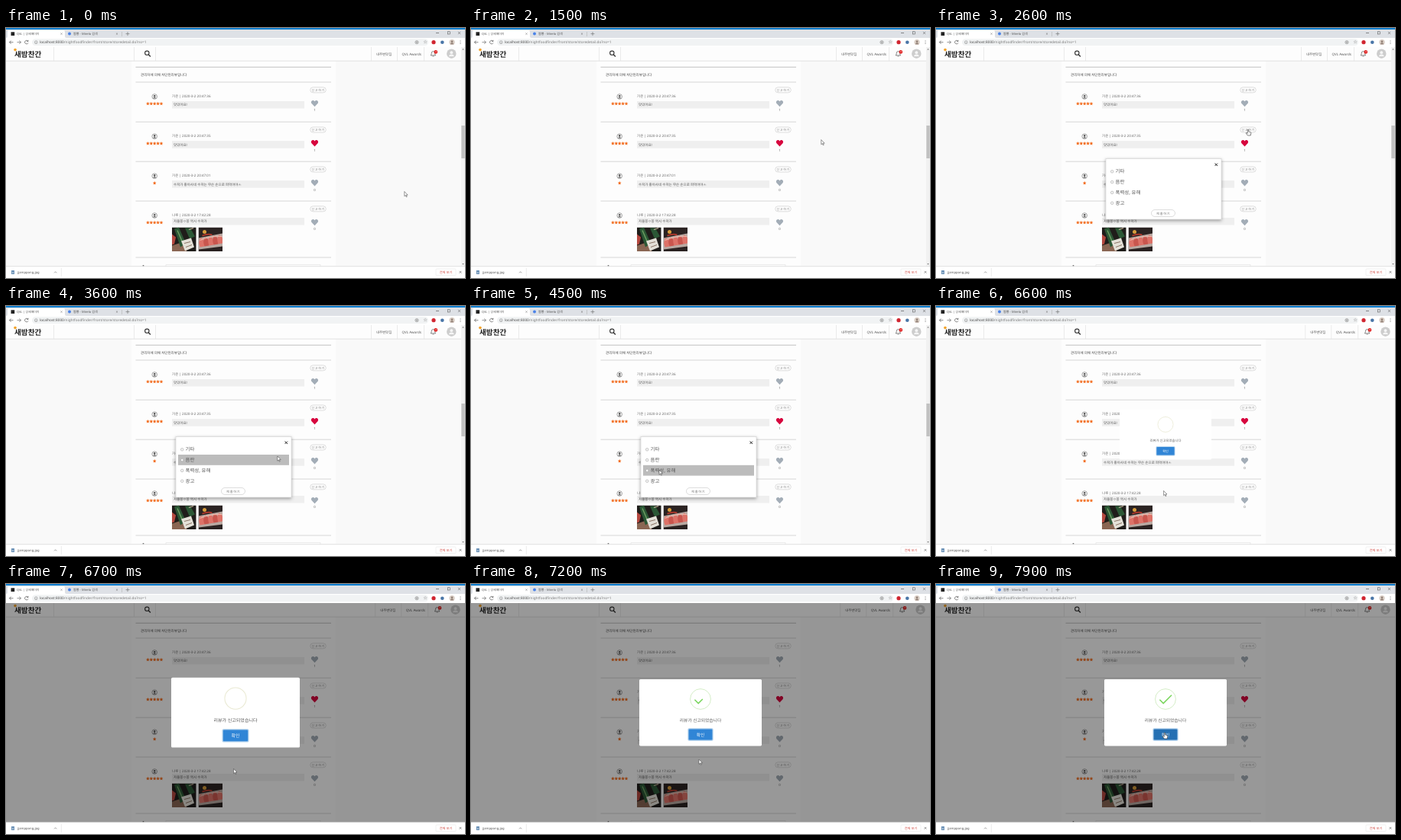
An HTML page for the animation above (8 s loop, 600 px wide and 328 px high).

```html
<!DOCTYPE html>
<html lang="ko">
<head>
<meta charset="utf-8">
<title>Review report</title>
<style>
  html, body { margin: 0; width: 100%; height: 100%; overflow: hidden; background: #fff; }
  svg { display: block; }
  #stage { width: 600px; height: 328px; text-rendering: geometricPrecision;
    font-family: "Noto Sans", "Noto Sans CJK KR", "Noto Sans CJK", sans-serif; }
</style>
</head>
<body>
<svg id="stage" viewBox="0 0 600 328" xmlns="http://www.w3.org/2000/svg"></svg>
<script>
const LOOP = 8000, STEP = 100;
const stage = document.getElementById('stage');

// Drawing helpers; text is placed by its vertical centre.
const rect = (x, y, w, h, fill, extra = '') => `<rect x="${x}" y="${y}" width="${w}" height="${h}" fill="${fill}" ${extra}/>`;
const circle = (x, y, r, fill, extra = '') => `<circle cx="${x}" cy="${y}" r="${r}" fill="${fill}" ${extra}/>`;
const path = (d, stroke, width = .7, fill = 'none', extra = '') =>
  `<path d="${d}" stroke="${stroke}" stroke-width="${width}" fill="${fill}" ${extra}/>`;
const shape = (d, fill) => path(d, 'none', 0, fill);
const text = (x, y, size, content, fill = '#555', extra = '') =>
  `<text x="${x}" y="${y + size * .36}" font-size="${size}px" fill="${fill}" ${extra}>${content}</text>`;
const group = (id, content, extra = '') => `<g id="${id}" ${extra}>${content}</g>`;
const middle = 'text-anchor="middle"';
const cross = (x, y, r, color, width) => path(`M${x - r} ${y - r}l${2 * r} ${2 * r}m0 ${-2 * r}l${-2 * r} ${2 * r}`, color, width);

function star(x, y, r, fill) {
  const points = Array.from({ length: 10 }, (_, i) => {
    const radius = i % 2 ? r * .45 : r, angle = i * Math.PI / 5;
    return `${x + radius * Math.sin(angle)},${y - radius * Math.cos(angle)}`;
  });
  return `<polygon points="${points.join(' ')}" fill="${fill}"/>`;
}

function pill(x, y, w, h, label, size) {
  return rect(x - w / 2, y - h / 2, w, h, '#fff', `rx="${h / 2}" stroke="#bbb" stroke-width=".5"`) +
    text(x + .2, y, size, label, '#777', middle + ' letter-spacing=".7"');
}

function browserTop() {
  return rect(0, 0, 600, 13, '#dee1e6') + rect(0, 0, 600, 2, '#0b7fd0') +
    shape('M0 13Q2 13 2 11V5Q2 3 4 3H75Q77 3 77 5V11Q77 13 79 13Z', '#fff') +
    rect(6.5, 5.3, 4.7, 4.7, '#222') + text(14, 7.6, 3.9, 'QVL | 상세페이지', '#555') + cross(72.5, 7.6, 1.1, '#666', .5) +
    circle(83, 7.6, 2, '#4b83e8') + text(88, 7.6, 4.1, '짬뽕 - Mirelo 검색', '#555') + cross(145, 7.6, 1.1, '#666', .5) +
    path('M151.5 5V11', '#aaa', .5) + path('M156.5 7.6h5m-2.5 -2.5v5', '#666', .6) +
    path('M562 6.5h4', '#444', .6) + rect(577.5, 4.8, 3.2, 3.2, 'none', 'stroke="#444" stroke-width=".5"') + cross(592.5, 6.5, 1.6, '#444', .5) +
    rect(0, 13, 600, 12, '#fff') + rect(34, 14.3, 518, 9, '#f1f3f4', 'rx="4.5"') +
    path('M9.5 18.7h-5m2.2 -2.2l-2.2 2.2l2.2 2.2', '#555', .7) +
    path('M14.5 18.7h5m-2.2 -2.2l2.2 2.2l-2.2 2.2', '#666', .7) +
    path('M28.7 17.2A2.3 2.3 0 1 0 29 19.5M29 15.8v1.8h-1.8', '#555', .7) +
    circle(39.3, 18.7, 1.9, 'none', 'stroke="#777" stroke-width=".5"') + path('M39.3 17.6v.5m0 .5v1.5', '#777', .5) +
    text(44, 18.7, 4.7, '<tspan fill="#444">localhost:8000</tspan>/nightfoodfinder/front/store/storedetail.do?no=1', '#777') +
    circle(537, 18.7, 2.1, 'none', 'stroke="#777" stroke-width=".6"') + path('M535.8 18.7h2.4m-1.2 -1.2v2.4', '#777', .6) +
    text(548, 18.5, 5.2, '☆', '#666', middle) + circle(559, 18.7, 2.6, '#d02530') + circle(570.3, 18.7, 2.3, '#4a76a8') +
    circle(583, 18.7, 3.6, '#d9cdc4') + circle(583, 17.8, 1.2, '#8b7a70') + shape('M580.8 21.2q2.2 -4 4.4 0z', '#8b7a70') +
    [16.8, 18.7, 20.6].map(y => circle(594, y, .5, '#666')).join('');
}

function header() {
  const right = path('M477.5 25V43M511.5 25V43M546.5 25V43', '#e0e0e0', .6) +
    text(484, 34, 4.4, '내주변맛집') + text(517.5, 34, 4.5, 'QVL Awards') +
    path('M555.2 36q1 -.8 1 -2.8q0 -2.6 2.2 -2.6q2.2 0 2.2 2.6q0 2 1 2.8zM557.6 37h1.7', '#555', .7) +
    circle(561.8, 31.4, 2.3, '#e02020') + text(561.8, 31.4, 3, '4', '#fff', middle) +
    circle(582.3, 33.7, 6.2, '#cdcdcd') + circle(582.3, 32.2, 1.9, '#f6f6f6') + shape('M578.9 37.2q.3 -2.7 3.4 -2.7q3.1 0 3.4 2.7z', '#f6f6f6');
  return rect(0, 25, 600, 18, '#fdfdfd') + path('M0 43.2H600', '#dcdcdc', .8) +
    path('M62.5 25V43M167.5 25V43M195.5 25V43', '#e0e0e0', .6) +
    circle(12, 28.6, 1.8, '#f3a32b') + text(11, 34.8, 9.6, '새밤찬간', '#222', 'font-weight="700"') +
    circle(184.3, 32.8, 2.7, 'none', 'stroke="#333" stroke-width="1.1"') + path('M186.3 34.9l2.6 2.7', '#333', 1.4) +
    group('headerRight', right);
}

function review(top, name, date, comment, stars, likes, liked) {
  const boxY = top + (name === '나루' ? 22 : 25);
  const iconY = top + 19;
  const rating = Array.from({ length: stars }, (_, i) => star(194.2 + (i - (stars - 1) / 2) * 4.4, top + 28.3, 2.5, '#f26a1b')).join('');
  return path(`M169.5 ${top}H425`, '#ccc', .8) +
    circle(194.2, iconY, 3.3, '#fff', 'stroke="#666" stroke-width=".6"') + circle(194.2, iconY - .8, 1.3, '#555') +
    shape(`M192 ${iconY + 2.2}q2.2 -3 4.4 0z`, '#555') + rating +
    text(217, top + 18.4, 4.5, `${name} | ${date}`, '#666') +
    rect(217, boxY, 173, 9.5, '#efefef') + text(219, boxY + 4.8, 4.5, comment) +
    pill(408, top + 10.3, 20.5, 7, '신고하기', 4) +
    shape(`M403.5 ${top + 32.2}l-4 -4.2c-2 -2.6 1.6 -6 4 -2.8c2.4 -3.2 6 .2 4 2.8z`, liked ? '#d7063e' : '#a3adb7') +
    text(403.5, top + 36.8, 4.3, likes, '#666', middle);
}

function photos() {
  const bottles = rect(0, 0, 32, 32, '#1f1d1a') + shape('M0 24l12 -4l8 12H0z', '#8a6653') +
    shape('M3 2l6 -2l9 21l-7 5zM17 1h7l6 11l-7 3z', '#2b5735') + path('M7 4l6 14', '#6fa062', 1.4) +
    shape('M12 18l13 -4l4 12l-12 5z', '#e4e1d8') + path('M16 21l8 -2m-6 7l8 -3', '#8a7464', 1) +
    shape('M0 9l5 4l-2 9l-3 1z', '#b5483f') + path('M22 3l6 -2', '#c9b9a0', 1.2);
  const shrimp = rect(0, 0, 32, 32, '#2b2322') + shape('M0 14L32 8V25L0 29z', '#b9a9a2') +
    [0, 1, 2, 3, 4].map(i => shape(`M${2 + i * 6} ${26 - i}q-3 -8 1 -12q6 2 5 11z`, i % 2 ? '#c9564e' : '#dd7268')).join('') +
    path('M2 17Q15 11 31 12', '#efb5a8', 1.2) + circle(8, 6, 2.5, '#d79c3c') + path('M5 11q8 -3 13 -1', '#b73a2d', 1.8);
  const frame = (x, content) => `<svg x="${x}" y="261.5" width="31.5" height="31.5">${content}</svg>`;
  return frame(217, bottles) + frame(251.5, shrimp);
}

function page() {
  return rect(0, 43, 600, 270, '#f9f9f9') + rect(164, 43, 267, 270, '#fdfdfd') +
    path('M169.5 51.3H425', '#aaa', .7) + text(176, 61.3, 4.5, '관리자에 의해 차단된리뷰입니다', '#444') +
    review(71, '가온', '2020-3-2 20:47:36', '맛있어요!', 5, 1, false) +
    review(123.2, '가온', '2020-3-2 20:47:35', '맛있어요!', 5, 1, true) +
    review(175.2, '가온', '2020-3-2 20:47:01', '수저가 좋아사네 수저는 무슨 손으로 퍼먹어야ㅗ', 1, 0, false) +
    review(227, '나루', '2020-3-2 17:42:28', '저들쫑ㅇ쫑 역시 수저가', 5, 0, false) +
    photos() + path('M169.5 301H425', '#ccc', .8) + path('M209 313v-2.5H411v2.5', '#e0e0e0', .6) + circle(179.5, 312, 1, '#666');
}

function scrollbar() {
  return rect(595, 25, 5, 288, '#f1f1f1') + rect(595.3, 128, 4.4, 43, '#c1c1c1') +
    shape('M596.3 28.5l1.2 -1.4l1.2 1.4zM596.3 309l1.2 1.4l1.2 -1.4z', '#666');
}

function downloads() {
  return rect(0, 312.5, 600, 15.5, '#fff') + path('M0 312.7H600', '#ccc', .6) +
    rect(7, 318, 4, 5, '#6d93b8') + path('M8 320.5h2m-2 1h2', '#fff', .4) +
    text(15, 320.5, 4.2, 'jjamppong.jpg', '#555') + path('M63 321.3l1.6 -1.6l1.6 1.6', '#666', .6) + path('M72.3 315V326', '#ddd', .6) +
    rect(562, 316, 26, 8.6, '#fff', 'rx="1" stroke="#e2e2e2" stroke-width=".5"') +
    text(575, 320.3, 4.2, '전체 보기', '#d14a42', middle) + cross(594, 320.3, 1.4, '#555', .6);
}

const ROW_TOP = 181.2, ROW_HEIGHT = 13.8;
function modal() {
  const options = ['기타', '음란', '폭력성, 유해', '광고'].map((label, i) => {
    const y = ROW_TOP + ROW_HEIGHT * (i + .5);
    return circle(230.2, y + .2, 1.8, '#f4f4f4', 'stroke="#999" stroke-width=".5"') + text(234.5, y, 6.4, label);
  }).join('');
  return rect(222, 171.5, 151, 79.5, '#fff', 'stroke="#bbb" stroke-width=".4" filter="url(#shadow)"') +
    cross(366.3, 179.3, 1.7, '#222', 1) + rect(225, 0, 145, ROW_HEIGHT, '#bcbcbc', 'id="hover"') + options +
    circle(230.2, ROW_TOP + ROW_HEIGHT * 2.5 + .2, 1.2, '#555', 'id="chosen"') + pill(297, 243, 31, 9, '제출하기', 4.2);
}

// Alert is drawn around its own centre so it can be scaled.
function alertBox() {
  return rect(-80, -43.7, 160, 87.4, '#fff', 'rx="1.6"') +
    circle(0, -17.7, 13.4, 'none', 'id="ring" stroke-width="1"') +
    path('M-7.6 -16.9L-2.8 -12.1L8 -23', '#79d65c', 1.5, 'none', 'id="tick" pathLength="1" stroke-dasharray="1 2"') +
    text(0, 10, 5.75, '리뷰가 신고되었습니다', '#595959', middle) +
    rect(-16.6, 20.6, 33.2, 16.4, '#a8cbea', 'rx="1.8"') + rect(-15.4, 21.8, 30.8, 14, '#3085d6', 'id="confirm" rx="1.2"') +
    text(0, 28.8, 5.6, '확인', '#fff', middle);
}

const arrow = path('M0 0V6.2L1.5 4.9L2.5 7.2L3.4 6.8L2.4 4.6H4.4Z', '#333', .5, '#fff');
const hand = path('M-.7 .4Q0 -.5 .7 .4V3L3 3.5Q3.9 3.8 3.8 4.8L3.2 8H-.6L-2.9 5Q-2.7 3.9 -1.7 4.6L-.7 5.4Z', '#333', .6, '#fff');

stage.innerHTML = `<defs><filter id="shadow" x="-10%" y="-15%" width="120%" height="135%">
  <feDropShadow dx="0" dy="1.5" stdDeviation="2.2" flood-opacity=".4"/></filter></defs>` +
  page() + header() + group('scrollbar', scrollbar()) + group('modal', modal()) +
  rect(0, 25, 600, 288, '#000', 'id="backdrop" opacity=".4"') + group('alert', alertBox()) +
  browserTop() + downloads() + group('cursor', group('arrow', arrow) + group('hand', hand));

const part = Object.fromEntries([...stage.querySelectorAll('[id]')].map(el => [el.id, el]));
const show = (el, on) => el.setAttribute('display', on ? 'inline' : 'none');
const clamp = v => Math.min(1, Math.max(0, v));
const smooth = p => p * p * (3 - 2 * p);

// Interpolates rows of [time, ...values].
function track(keys, t, ease = p => p) {
  const next = keys.findIndex(k => k[0] > t);
  if (next < 0) return keys.at(-1).slice(1);
  if (next === 0) return keys[0].slice(1);
  const a = keys[next - 1], b = keys[next], p = ease((t - a[0]) / (b[0] - a[0]));
  return a.slice(1).map((v, i) => v + (b[i + 1] - v) * p);
}

const POINTER = [[300, 520.8, 214.5], [1500, 457.8, 146.6], [2100, 408, 133], [2700, 408, 133], [3600, 354.8, 197],
  [4300, 246, 215], [4800, 246, 215], [5400, 296.5, 241.3], [5800, 296.5, 241.3], [6500, 297.6, 242.4], [7000, 297.6, 242.4], [7600, 299, 195]];
const POP = [[6580, .7], [6600, .75], [6700, 1.05], [6800, .95], [6900, 1]];

function draw(t) {
  const [x, y] = track(POINTER, t, smooth);
  const modalOpen = t >= 2600 && t < 6500, alertOpen = t >= 6600;
  const overButton = (t >= 2100 && t < 2700) || (t >= 5300 && t < 6500) || t >= 7600;
  const row = Math.floor((y - ROW_TOP) / ROW_HEIGHT);

  show(part.modal, modalOpen);
  show(part.hover, row >= 0 && row < 4 && x > 225 && x < 370);
  part.hover.setAttribute('y', ROW_TOP + row * ROW_HEIGHT);
  show(part.chosen, t >= 4600);

  show(part.scrollbar, !alertOpen);
  part.headerRight.setAttribute('transform', `translate(${alertOpen ? 5.2 : 0} 0)`);
  show(part.backdrop, t >= 6700);
  show(part.alert, alertOpen);
  part.alert.setAttribute('transform', `translate(300 168.7) scale(${track(POP, t)[0]})`);
  const tickProgress = clamp((t - 7000) / 300);
  show(part.tick, tickProgress > 0);
  part.tick.setAttribute('stroke-dashoffset', 1 - tickProgress);
  part.ring.setAttribute('stroke', tickProgress > 0 ? '#d5eec8' : '#e9e9d2');
  part.confirm.setAttribute('fill', t >= 7600 ? '#2570b3' : '#3085d6');

  part.cursor.setAttribute('transform', `translate(${x} ${y})`);
  show(part.arrow, !overButton);
  show(part.hand, overButton);
}

const start = performance.now();
function animate() {
  const t = (performance.now() - start) % LOOP;
  draw(Math.floor(t / STEP) * STEP);
  requestAnimationFrame(animate);
}
animate();
</script>
</body>
</html>
```
